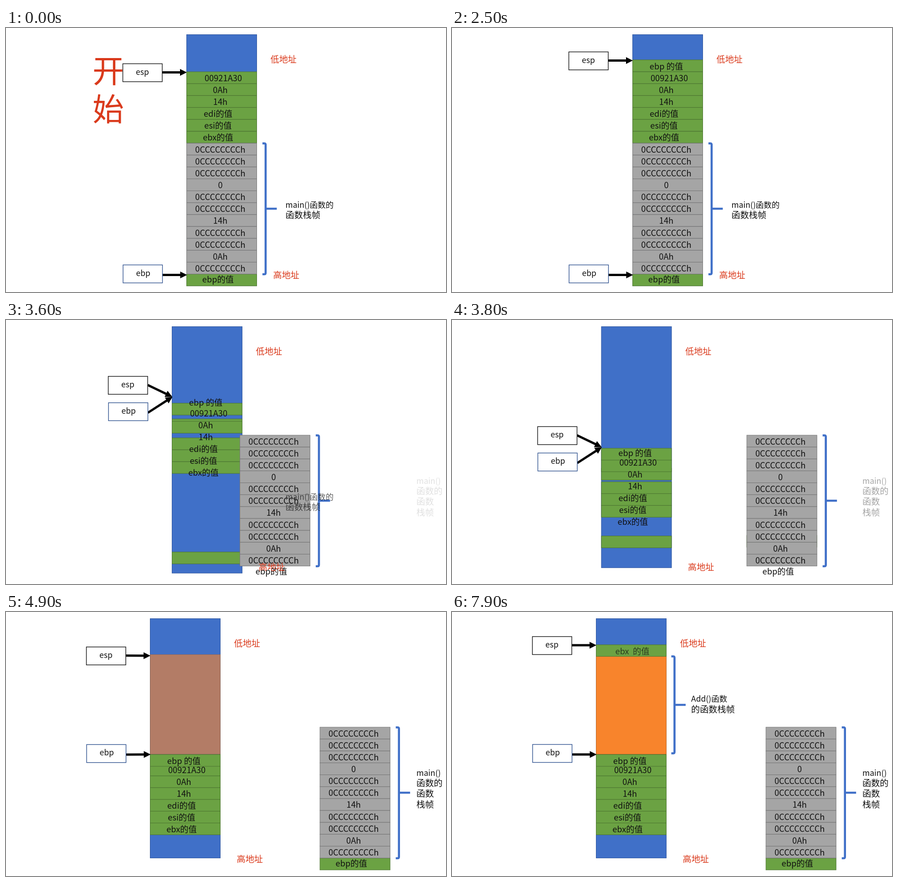
An HTML page that plays this animation: 966x580 px, repeating every 8 s.

```html
<!DOCTYPE html>
<html lang="zh">
<head>
<meta charset="utf-8">
<title>函数栈帧</title>
<style>
  html, body { margin: 0; width: 100%; height: 100%; overflow: hidden; background: #fff; }
  svg { display: block; width: 966px; height: 580px; }
  text { font: 350 18.3px "Noto Sans CJK SC", "Noto Sans CJK", sans-serif; fill: #111; white-space: pre; }
  .mid { text-anchor: middle; }
  .label { font-size: 19.2px; }
  .red { fill: #da3a1c; }
  .title { font-size: 69px; font-weight: 300; }
  .small { font-size: 17.5px; }
  .blue { fill: #4070c8; stroke: #2f559c; }
  .orange { fill: #f8842c; stroke: #b5662a; }
  .green { fill: #6ba243; stroke: #4c7530; }
  .grey { fill: #a5a5a5; stroke: #777; }
  .box { fill: #fff; stroke: #111; stroke-width: 1.4; }
  .box.navy { stroke: #2f528f; }
  .bracket { fill: none; stroke: #4070c8; stroke-width: 4.6; }
  .shaft { stroke: #000; stroke-width: 5; }
</style>
</head>
<body>
<svg id="stage" viewBox="0 0 966 580"></svg>
<script>
const LOOP = 8000, STEP = 100;
const LEFT = 396.5, CELL_W = 154, CELL_H = 26;
const SHIFT_LEFT = -80, SHIFT_RIGHT = 292.7;
// Times at which each step of the lesson begins
const PUSH = 400, NAME = 1400, REBASE = 2500, SPLIT = 3500, GROW = 4400, CAPTION = 5300, SAVE = 6500, SAVE_NAME = 7700;

const stage = document.getElementById('stage');
let now = 0;

const set = (el, attrs) => {
  for (const key in attrs) el.setAttribute(key, attrs[key]);
  return el;
};
const add = (parent, tag, attrs = {}) =>
  parent.appendChild(set(document.createElementNS('http://www.w3.org/2000/svg', tag), attrs));
const group = () => add(stage, 'g');
const rect = (parent, cls, x, y, width, height) =>
  add(parent, 'rect', { class: cls, x, y, width, height });
const text = (parent, str, x, y, cls = '') => {
  const el = add(parent, 'text', { class: cls, x, y });
  el.textContent = str;
  return el;
};
const lines = (parent, strings, x, y, pitch, cls) =>
  strings.forEach((str, i) => text(parent, str, x, y + pitch * i, /[()]/.test(str) ? 'small' : cls));
const bracket = (parent, x, top, bottom, mid) => add(parent, 'path', {
  class: 'bracket',
  d: `M${x} ${top}h4q3 0 3 3V${bottom - 3}q0 3 -3 3h-4M${x + 7} ${mid}h24.5`
});

const mix = (a, b, p) => a + (b - a) * p;
const progress = (start, length) => Math.min(1, Math.max(0, (now - start) / length));
const ease = start => 1 - (1 - progress(start, 600)) ** 2.8;
const fade = (el, start, length = 800) => set(el, { opacity: progress(start, length) });
const fadeOut = (el, start) => set(el, { opacity: 1 - progress(start, 300) });
const shift = (el, x, y = 0) => set(el, { transform: `translate(${x} ${y})` });

// Even rows of the full stack, and the slots the green cells take after the split
const rowY = row => 70 + 26.15 * row;
const slotY = slot => Math.max(313, 308 + 25.9 * slot);
const cell = (parent, cls, row) => rect(parent, cls, LEFT, rowY(row), CELL_W, CELL_H);
const cellText = (parent, str, row, x = /\w的/.test(str) ? 465.5 : 470.5) =>
  text(parent, str, x, rowY(row) + 20.5, 'mid');

// Each pose: start, height of the tip, height of the tail above or below it
function pointer(name, cls, handle, poses) {
  const shaft = add(stage, 'line', { class: 'shaft' });
  const head = add(stage, 'path', { d: 'M0 0L-15 -7.5V7.5Z' });
  const box = rect(stage, cls, 0, 0, 86.5, 39.5);
  const label = text(stage, name, 0, 0, 'small');
  return tipX => {
    const [, tipY, rise] = poses.reduce((cur, next) => next.map((v, i) => mix(cur[i], v, ease(next[0]))));
    const x = tipX - 140.5, y = tipY + rise - handle;
    const x1 = x + 86.5, y1 = tipY + rise;
    const angle = Math.atan2(-rise, tipX - x1);
    set(box, { x, y });
    set(label, { x: x + 28.5, y: y + 24 });
    set(shaft, { x1, y1, x2: tipX - 12 * Math.cos(angle), y2: tipY - 12 * Math.sin(angle) });
    set(head, { transform: `translate(${tipX} ${tipY}) rotate(${angle * 180 / Math.PI})` });
  };
}

const column = rect(stage, 'blue', LEFT, 14.5, CELL_W, 552);
const orange = rect(stage, 'orange', LEFT + SHIFT_LEFT, 93.5, CELL_W, 219);

const pushed = cell(stage, 'green', 0);
const greens = [18, 6, 5, 4, 2, 3, 1].map((row, i) =>
  ({ el: cell(stage, 'green', row), from: rowY(row), to: slotY(6 - i) }));

const savedCell = rect(stage, 'green', LEFT + SHIFT_LEFT, 72, CELL_W, 25.5);
const savedText = text(stage, 'ebx  的值', 396, 93, 'mid');

const words = ['ebp 的值', '00921A30', '0Ah', '14h', 'edi的值', 'esi的值', 'ebx的值'].map((str, row) =>
  ({ el: cellText(stage, str, row, row === 1 ? 477 : undefined), dy: slotY(row) - rowY(row) }));

const frame = group();
const locals = { 10: '0', 13: '14h', 16: '0Ah' };
for (let row = 7; row < 18; row++) {
  cell(frame, 'grey', row);
  cellText(frame, locals[row] || '0CCCCCCCCh', row);
}
cellText(frame, 'ebp的值', 17.9);
bracket(frame, 563, 253.5, 541, 397);

const sides = group();
text(sides, '低地址', 580.5, 76, 'label red');
text(sides, '高地址', 586.5, 550, 'label red');

const mainWide = group();
lines(mainWide, ['main()函数的', '函数栈帧'], 613.5, 394.5, 23, 'label');
const mainTall = group();
lines(mainTall, ['main()', '函数的', '函数', '栈帧'], 901, 360, 23.2, 'label');
const addFrame = group();
bracket(addFrame, 481.5, 97.5, 310.5, 204);
lines(addFrame, ['Add()函数', '的函数栈帧'], 525, 197, 23.5, 'label');

const title = group();
lines(title, ['开', '始'], 190, 119.5, 84.5, 'title red');

const esp = pointer('esp', 'box', 19, [
  [0, 97.5, 0], [PUSH, 71.5, 0], [REBASE, 72, -26], [SPLIT, 314, -26], [GROW, 94.5, 0], [SAVE, 73, 0]
]);
const ebp = pointer('ebp', 'box navy', 22, [
  [0, 542.5, 0], [REBASE, 72, 35], [SPLIT, 314, 35], [GROW, 313, 0]
]);

function draw() {
  const slide = ease(SPLIT), dx = SHIFT_LEFT * slide;
  set(column, { x: LEFT + dx, height: mix(552, 526, slide) });
  set(pushed, { x: LEFT + SHIFT_RIGHT * slide, y: mix(rowY(0), rowY(18), slide) });
  for (const { el, from, to } of greens) set(el, { x: LEFT + dx, y: mix(from, to, slide) });
  for (const { el, dy } of words) shift(el, dx, dy * slide);
  shift(frame, SHIFT_RIGHT * slide);
  shift(sides, dx);
  esp(397 + dx);
  ebp(397.5 + dx);

  fade(pushed, PUSH);
  fadeOut(title, NAME);
  fade(words[0].el, NAME);
  fadeOut(mainWide, SPLIT);
  fade(mainTall, SPLIT);
  fade(orange, GROW);
  fade(addFrame, CAPTION);
  fade(savedCell, SAVE, 600);
  fade(savedText, SAVE_NAME, 280);
}

function tick() {
  now = Math.floor(performance.now() % LOOP / STEP) * STEP;
  draw();
  requestAnimationFrame(tick);
}
tick();
</script>
</body>
</html>
```
